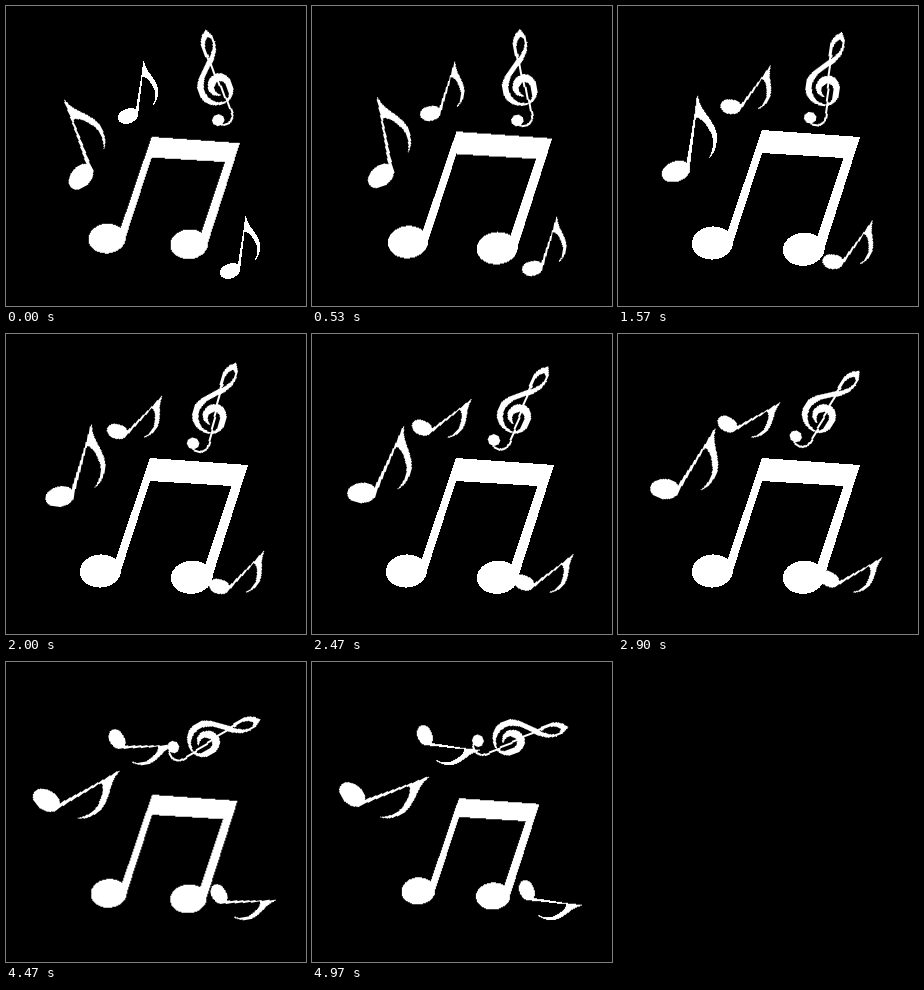
Animation of 300 by 300 pixels, one loop 5010 ms. Source, as an HTML page:

```html
<!DOCTYPE html>
<html lang="en">
<head>
<meta charset="utf-8">
<title>Music notes</title>
<style>
  html, body { margin: 0; width: 100%; height: 100%; overflow: hidden; background: #000; }
  svg { display: block; width: 100vw; height: 100vh; fill: #fff; shape-rendering: crispEdges; }

  .turn, .pulse { transform-origin: 0 0; }
  .turn { animation: turn 5010ms linear infinite; }
  .pulse { animation: pulse 5010ms linear infinite; }

  @keyframes turn {
    to { transform: rotate(90deg); }
  }
  /* Grow in, hold, shrink out, both with a quadratic ease-out */
  @keyframes pulse {
    0% { transform: scale(.9); animation-timing-function: cubic-bezier(.333, .667, .667, 1); }
    20% { transform: scale(1); }
    80% { transform: scale(1); animation-timing-function: cubic-bezier(.333, .667, .667, 1); }
    100% { transform: scale(.82); }
  }
</style>
</head>
<body>
<svg viewBox="0 0 300 300">
  <defs>
    <g id="note">
      <ellipse rx="10.7" ry="7.4" transform="translate(-13.8 23) rotate(-20)"/>
      <path d="M1.3-32.5 L2.5-32.5 L-4 22 L-7 22 L-.2-20 Z"/>
      <path d="M2-32.5 C3-20 17-14 16 0 C16 6 13 11 10 14 C14.5 6 14.5-3 9.5-9 C7-13 4-16 0-17 Z"/>
    </g>
  </defs>

  <!-- Beamed pair -->
  <g transform="translate(160 192)">
    <g class="pulse">
      <path d="M-16-68 L82-61 L46.5 50 L38 42 L65.5-40 L-16-45 L-45.5 46 L-52 38 Z"/>
      <ellipse rx="20.7" ry="16.5" transform="translate(-65.5 45) rotate(-5)"/>
      <ellipse rx="21" ry="16.5" transform="translate(25.7 51.3) rotate(-5)"/>
    </g>
  </g>

  <!-- Single notes -->
  <g transform="translate(136 87)"><use class="turn" href="#note"/></g>
  <g transform="translate(238 242)"><use class="turn" href="#note"/></g>
  <g transform="translate(77 134) rotate(-28) scale(1.37)"><use class="turn" href="#note"/></g>

  <!-- Treble clef -->
  <g transform="translate(207 73) rotate(-19.8)">
    <g class="turn">
      <path d="M1-20 C-3-34 1-45 10-49 C17-40 16-28 8-19 C0-10 -12-4 -12 9
        C-12 18 -5 25 3 25 C8 25 10.5 20 10.5 14 C10.5 8 8 4 5 4 C1 4 -2 7 -2 11
        C-2 14 0 16 2 18 C-5 18 -8 13 -8 8 C-8 1 -2-4 5-4 C12-4 16.5 4 16.5 11
        C16.5 20 11 27 2 27 C-10 27 -18.5 20 -18.5 8 C-18.5-4 -6-12 1-19
        C8-25 12-30 12-36 C12-39 11-41 9-41 C5-40 1-32 4-22 Z"/>
      <path d="M2-22 L6.5 34 C8 46 -2 50 -9 45" fill="none" stroke="#fff" stroke-width="2"/>
      <circle cx="-9" cy="40.5" r="6"/>
    </g>
  </g>
</svg>
</body>
</html>
```
